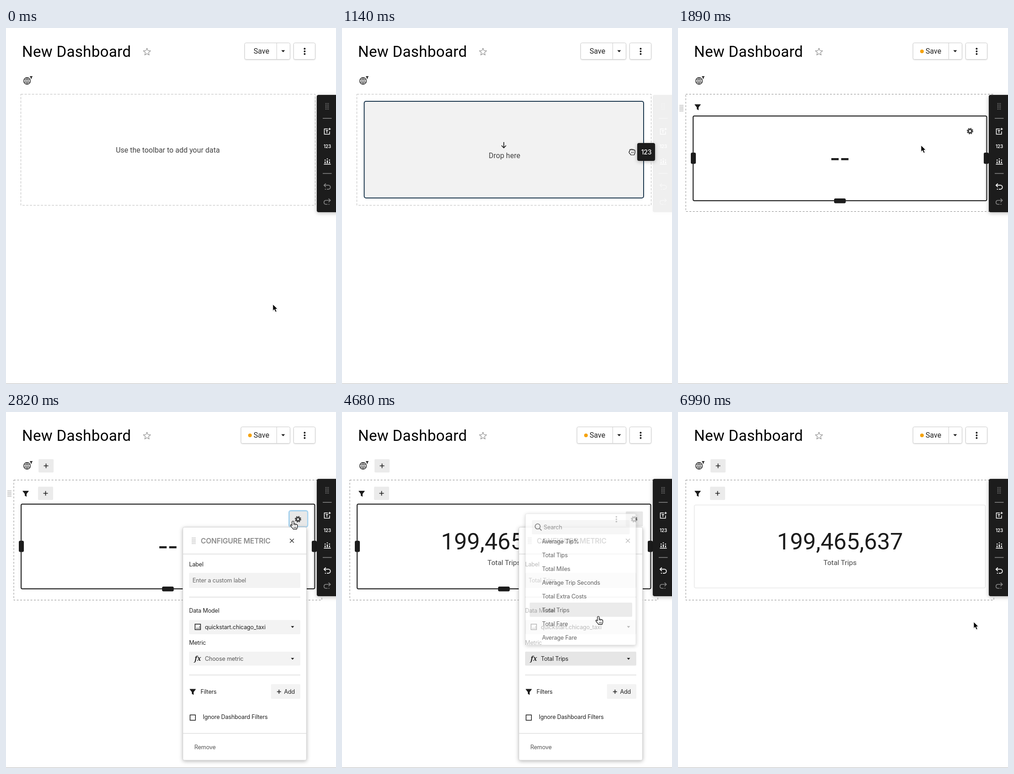
These frames come from a looping animation (721 px wide and 777 px high, 7020 ms). An HTML page:

```html
<!DOCTYPE html>
<html lang="en">
<head>
<meta charset="utf-8">
<title>Dashboard builder</title>
<style>
html, body { margin: 0; width: 100%; height: 100%; overflow: hidden; background: #fff; }
svg { display: block; width: 721px; height: 777px; }
text { white-space: pre; }
.r { font-family: Roboto, sans-serif; font-size: 16px; }
.i { font-family: Inter, sans-serif; font-size: 12.6px; letter-spacing: -.2px; }
.shadow { filter: drop-shadow(0 2px 4px rgba(0,0,0,.28)); }
.soft { filter: drop-shadow(0 1px 1px rgba(0,0,0,.13)); }
</style>
</head>
<body>
<svg id="stage" viewBox="0 0 721 777"></svg>
<script>
const LOOP = 7020, INK = '#1c1c1c';

const text = (x, y, s, cls = 'i', fill = '#222', more = '') =>
  `<text x="${x}" y="${y}" class="${cls}" fill="${fill}" ${more}>${s}</text>`;
const box = (x, y, w, h, fill, r = 2, more = '') =>
  `<rect x="${x}" y="${y}" width="${w}" height="${h}" rx="${r}" fill="${fill}" ${more}/>`;
const path = (d, stroke, w = 1, more = '') =>
  `<path d="${d}" fill="none" stroke="${stroke}" stroke-width="${w}" ${more}/>`;
const solid = (d, fill = INK, more = '') => `<path d="${d}" fill="${fill}" ${more}/>`;
const dot = (x, y, r, fill = INK) => `<circle cx="${x}" cy="${y}" r="${r}" fill="${fill}"/>`;
const group = (id, inner, more = '') => `<g id="${id}" ${more}>${inner}</g>`;
const caret = (x, y, s = 4) => solid(`M${x - s} ${y - s / 2}h${2 * s}l${-s} ${s + .5}z`);
const kebab = (x, y, gap, r, fill) => [-gap, 0, gap].map(d => dot(x, y + d, r, fill)).join('');
const plus = (x, y, r = 5) => path(`M${x - r} ${y}h${2 * r}M${x} ${y - r}v${2 * r}`, INK, 1.6);
const funnel = (x, y, k = 1) =>
  solid('M-6.5 -6h13v1L2 .8V7L-2 4.6V.8L-6.5-5z', INK, `transform="translate(${x} ${y}) scale(${k})"`);
const grip = (x, y, fill) => {
  let s = '';
  for (let i = 0; i < 15; i++) s += dot(x + (i % 3 - 1) * 3, y + (Math.floor(i / 3) - 2) * 3.1, .75, fill);
  return s;
};

const gear =
  `<circle cx="638" cy="234" r="3.9" fill="none" stroke="#444" stroke-width="3.4"/>
   <circle cx="638" cy="234" r="6" fill="none" stroke="#444" stroke-width="2.2" stroke-dasharray="2.4 2.312"/>`;

const star = () => {
  let d = '';
  for (let i = 0; i < 10; i++) {
    const a = i * Math.PI / 5 - Math.PI / 2, r = i % 2 ? 3.7 : 8.3;
    d += (i ? 'L' : 'M') + (308 + r * Math.cos(a)).toFixed(2) + ' ' + (52.3 + r * Math.sin(a)).toFixed(2);
  }
  return path(d + 'z', '#888', 1.1, 'stroke-linejoin="round"');
};

const header =
  text(35, 62.5, 'New Dashboard', 'r', '#000', 'style="font-size:33px;letter-spacing:.35px"') + star() +
  `<rect id="saveBox" y="32.5" height="36" rx="3" fill="#fff" stroke="#ccc" class="soft"/>` +
  path('M591.5 33v35', '#ccc') + text(541, 56.3, 'Save', 'r') + caret(605.5, 50.5) +
  group('unsaved', dot(533, 51, 4, '#f5a30f')) +
  box(628.5, 32.5, 47, 36, '#fff', 3, 'stroke="#ccc" class="soft"') + kebab(652.5, 51, 5.7, 2);

const globe = group('globe',
  path('M38.7 117.5a7.3 7.3 0 1 0 14.6 0a7.3 7.3 0 1 0-14.6 0', INK, 1.4) +
  path('M39 115h14M39 120h14M46 110v15M46 110.2c-4.6 4-4.6 10.6 0 14.6c4.6-4 4.6-10.6 0-14.6', INK, .9) +
  funnel(55, 110, .47));

const emptyRow = group('empty',
  path('M32.5 144.5H675.5V387H32.5z', '#bbb', 1, 'stroke-dasharray="5 3"') +
  group('hint', text(353.5, 272, 'Use the toolbar to add your data', 'r', '#444', 'text-anchor="middle"')) +
  group('zone', box(48.5, 160, 610.5, 211, '#f2f2f2', 4, 'stroke="#1f3a50" stroke-width="2"') +
    path('M353.5 249v12M348.5 256.5l5 5l5-5', INK, 1.7) + text(320.5, 283.8, 'Drop here', 'r', '#444')));

const widget = group('widget',
  box(35.5, 203, 636, 181, '#fff', 3, 'stroke="#ddd"') +
  group('selected', box(33, 201, 641.5, 185, 'none', 3, `stroke="${INK}" stroke-width="2"`) +
    box(28, 281, 11, 24.5, INK, 3) + box(668, 281, 11, 24.5, INK, 3) + box(341, 381, 25.5, 10.5, INK, 3)) +
  group('blank', box(335, 293, 16, 4.5, INK, 0) + box(356.5, 293, 16, 4.5, INK, 0)) +
  group('metric', text(354, 300, '199,465,637', 'r', INK,
      'text-anchor="middle" style="font-size:50.5px"') +
    text(354, 334, 'Total Trips', 'r', '#444', 'text-anchor="middle" style="font-size:15.5px"')) +
  group('more', kebab(599.5, 234, 5.3, 1.8, '#555')) +
  group('ring', box(618.5, 215.5, 40.5, 35, 'none', 4, 'stroke="#a9d3ee" stroke-width="3"')) +
  group('gearBox', box(620, 217, 37.5, 32.5, '#e8e8e8', 2)) + group('gear', gear));

const row = group('row',
  `<rect id="rowBox" x="17" width="673" fill="none" stroke="#888" stroke-dasharray="4 3.5"/>` +
  group('rowTools', group('rowGrip', grip(7.5, 178, '#555')) + funnel(43, 178)) +
  group('adders', box(71, 103, 33, 29, '#ebebeb') + plus(87.5, 117.5) +
    box(70, 163, 33, 29, '#ebebeb') + plus(86.5, 177.5)) + widget);

const undo = 'M698.8 339.3l-4 3.9l4 3.9M695 343.2h9.5c5.6 0 5.6 8.6 0 8.6h-3.5M699 351.8h-2.2';
const toolbar = group('toolbar',
  box(679, 146, 50, 256, INK, 4, 'class="shadow"') + grip(701.5, 171, '#bbb') +
  path('M692 197.2h19.5M692 317.5h19.5', '#888', 1.6) +
  path('M703 220.3h-7.5v11.4h11.4v-6M698.5 223.5h5.5M701.2 223.5v5.5M704.5 220.5h5M707 218v5', '#fff', 1.5) +
  text(702, 262, '123', 'i', '#fff', 'text-anchor="middle" font-weight="600" style="font-size:9.8px"') +
  path('M694.5 297.3h15', '#fff', 1.6) + path('M697.2 291.5v3.7M702 289v6.2M706.8 291.5v3.7', '#fff', 2.2) +
  dot(697.2, 288.3, 1.2, '#fff') + dot(702, 285.6, 1.2, '#fff') + dot(706.8, 288.3, 1.2, '#fff') +
  `<path id="undo" d="${undo}" fill="none" stroke-width="1.7"/>` +
  path(undo, '#888', 1.6, 'transform="matrix(-1 0 0 1 1403.5 33)"'));

const divider = (x, y, w) => path(`M${x} ${y}h${w}`, '#ddd', 1.3);
const panel = group('panel',
  box(386.5, 251.5, 270, 508.5, '#fff', 3, 'stroke="#d5d5d5" class="shadow"') +
  grip(410, 281, '#777') +
  text(425.5, 286.7, 'CONFIGURE METRIC', 'i', '#8b8b8b', 'font-weight="600" style="font-size:15.6px"') +
  path('M620.3 276.7l8.6 8.6M628.9 276.7l-8.6 8.6', '#333', 1.4) +
  divider(387, 310, 269) + text(400, 337, 'Label') + box(400, 351, 243, 33, '#f3f3f3') +
  group('labelHint', text(407.5, 372, 'Enter a custom label', 'i', '#666')) +
  group('labelSet', text(407.5, 372, 'Total Trips', 'i', '#666')) +
  divider(400, 404, 243) + text(400, 438, 'Data Model') + box(400, 454, 243, 31, '#f3f3f3') +
  path('M413 463h12v12h-12z', INK, 1.5) + path('M416 472h1.5M419 472h1.5M422 472h1.5M422 469h1.5', INK, 1.5) +
  text(434.5, 473.8, 'quickstart.chicago_taxi') + caret(626, 469, 3.5) +
  text(400, 508, 'Metric') + `<rect id="picker" x="400" y="523" width="243" height="30.5" rx="2"/>` +
  text(412, 543, 'fx', '', INK, 'font-family="Noto Serif, serif" font-style="italic" font-weight="600" font-size="14"') +
  group('pickHint', text(434.5, 543, 'Choose metric', 'i', '#555')) +
  group('pickSet', text(434.5, 543, 'Total Trips')) + caret(626, 538.5, 3.5) +
  divider(400, 574, 243) + funnel(408, 610.5) + text(425, 614.8, 'Filters') +
  box(579, 594, 64, 32, '#f3f3f3') + plus(596.5, 610.5, 4.5) + text(607.5, 614.8, 'Add') +
  box(402.2, 661.2, 11.6, 11.6, '#fff', 0, `stroke="${INK}" stroke-width="1.5"`) +
  text(430, 670.3, 'Ignore Dashboard Filters') + divider(387, 701.5, 269) + text(411.5, 736.3, 'Remove', 'i', '#555'));

const items = ['Average Tip%', 'Total Tips', 'Total Miles', 'Average Trip Seconds',
  'Total Extra Costs', 'Total Trips', 'Total Fare', 'Average Fare'];
const menu = group('menu',
  box(401, 222, 241, 286.5, '#fff', 3, 'stroke="#ddd" class="shadow"') +
  box(415, 236, 213.5, 31, '#f3f3f3') + path('M432 254.5l4 4.2', '#555', 2) +
  '<circle cx="427.5" cy="249.8" r="5.6" fill="none" stroke="#555" stroke-width="1.8"/>' +
  text(440.5, 255.6, 'Search', 'i', '#666') +
  '<rect id="hover" x="410" width="224" height="31" rx="2" fill="#e2e2e2"/>' +
  items.map((s, i) => text(437, 286.5 + 30 * i, s)).join(''));

const tile = group('tile', box(11, -20, 39, 39, INK, 4, 'class="shadow"') +
  text(31, 5, '123', 'i', '#fff', 'text-anchor="middle" font-weight="500" style="font-size:14px"'));

const outline = 'stroke="#000" stroke-width="1.2" stroke-linejoin="round"';
const cursor = group('cursor',
  group('arrow', solid('M0 0V14.3L3.3 11.3L5.7 17L8.4 15.8L6 10.4H10.4z', '#000',
    'stroke="#fff" stroke-width="1" class="soft"')) +
  group('hand', solid('M-2 2a2 2 0 0 1 4 0v4.5c1-.8 2.5-.5 3 .5c1-.6 2.4-.2 2.8 .8c1-.3 2 .4 2 1.8v3' +
    'c0 2.6-1.5 3-1.5 5H.2c0-1.8-4-4.3-5.5-7.6c-.6-1.5 1-2.5 2.2-1.4L-2 10z', '#fff', outline) +
    path('M2 6.5v3M5 7.5v2.5M2 12.5v3M4.3 12.5v3M6.5 12.5v3', '#000', .9)) +
  group('fist', solid('M-5.5 -1.5v-3c0-1.5 2-2 2.8-.8c.5-1.4 2.7-1.4 3.2 0c.8-1 2.6-.7 3 .5c1.2-.6 2.6 .2 2.6 1.6' +
    'v4c0 2.6-1.6 3-1.6 5.2h-7.5c0-1.8-4.2-3.6-4-6.3c.1-1.2 1-1.4 1.5-1.2z', '#fff', outline) +
    path('M-1.5 -1v3.5M.8 -1v3.5M3 -1v3.5M-2.7-5v2M.5-5v2M3.5-4.5v2', '#000', .8)));

stage.innerHTML = box(0, 0, 721, 777, '#fff', 0) + path('M0 776.5h721', '#b5b5b5') +
  header + globe + emptyRow + row + toolbar + panel + menu + tile + cursor;

const el = {};
stage.querySelectorAll('[id]').forEach(n => el[n.id] = n);
const set = (id, o) => el[id].setAttribute('opacity', +o);
const place = (id, x, y) => el[id].setAttribute('transform', `translate(${x} ${y})`);
const ramp = (t, a, b) => Math.min(1, Math.max(0, (t - a) / (b - a)));
const during = (t, a, b) => t >= a && t < b;

// Pointer stops: time, x, y
const stops = [[0, 583, 603], [700, 702, 258], [800, 702, 258], [1140, 634, 271], [1450, 513, 267],
  [1770, 513, 267], [1890, 531, 256], [2220, 627, 238], [2830, 627, 238], [3390, 566, 537],
  [3960, 566, 537], [4600, 560, 446], [4950, 560, 446], [5350, 619, 283], [5880, 619, 283], [6240, 646, 458]];

function pointer(t) {
  const i = stops.findIndex(s => s[0] > t);
  if (i < 0) return stops[stops.length - 1].slice(1);
  const [t0, x0, y0] = stops[i - 1], [t1, x1, y1] = stops[i];
  const u = ramp(t, t0, t1), k = u * u * (3 - 2 * u);
  return [x0 + (x1 - x0) * k, y0 + (y1 - y0) * k];
}

function render(t) {
  const [x, y] = pointer(t);
  const dropped = t >= 1470, ready = t >= 2310, chosen = t >= 4665;
  const drag = during(t, 810, 1470);
  const panelOn = ramp(t, 2310, 2430) * (1 - ramp(t, 5430, 5580));
  const menuOn = ramp(t, 3480, 3600) * (1 - ramp(t, 4640, 4770));
  const over = dropped && (y < 387 || panelOn > 0);

  el.saveBox.setAttribute('x', dropped ? 513.5 : 521.5);
  el.saveBox.setAttribute('width', dropped ? 107 : 99);
  set('unsaved', dropped);
  place('globe', 0, ready ? 0 : -2);

  set('empty', !dropped);
  const zone = drag && x < 668;
  set('zone', zone);
  set('hint', !zone);
  set('tile', drag);
  place('tile', x, y);

  set('row', dropped);
  el.rowBox.setAttribute('y', ready ? 148.5 : 144.5);
  el.rowBox.setAttribute('height', ready ? 262 : 256);
  place('rowTools', 0, ready ? 0 : -5.5);
  place('rowGrip', 0, ready ? 0 : 2.5);
  set('rowGrip', dropped && y < 411);
  set('adders', ready);
  place('widget', 0, ready ? 0 : -9);
  set('selected', 1 - ramp(t, 6440, 6550));
  set('blank', !chosen);
  set('metric', chosen);
  set('more', chosen && over);
  set('gear', over);
  set('gearBox', during(t, 2130, 5430));
  set('ring', during(t, 2310, 3450));

  set('toolbar', drag ? 1 - .93 * ramp(t, 810, 930) : dropped ? .07 + .93 * ramp(t, 1470, 1600) : 1);
  el.undo.setAttribute('stroke', dropped ? '#fff' : '#888');

  set('panel', panelOn);
  set('labelHint', !chosen);
  set('labelSet', chosen);
  set('pickHint', !chosen);
  set('pickSet', chosen);
  el.picker.setAttribute('fill', t >= 3390 ? '#e6e6e6' : '#f3f3f3');
  set('menu', menuOn);
  const line = chosen ? 5 : Math.min(7, Math.max(5, Math.floor((y - 267) / 30)));
  el.hover.setAttribute('y', 266 + 30 * line);
  set('hover', y < 508);

  const hand = during(t, 560, 810) || during(t, 2160, 2960) || during(t, 3270, 4960) || during(t, 5270, 5490);
  set('fist', drag);
  set('hand', hand);
  set('arrow', !drag && !hand);
  place('cursor', x, y);
}

function frame(now) {
  render(now % LOOP);
  requestAnimationFrame(frame);
}
render(0);
requestAnimationFrame(frame);
</script>
</body>
</html>
```
